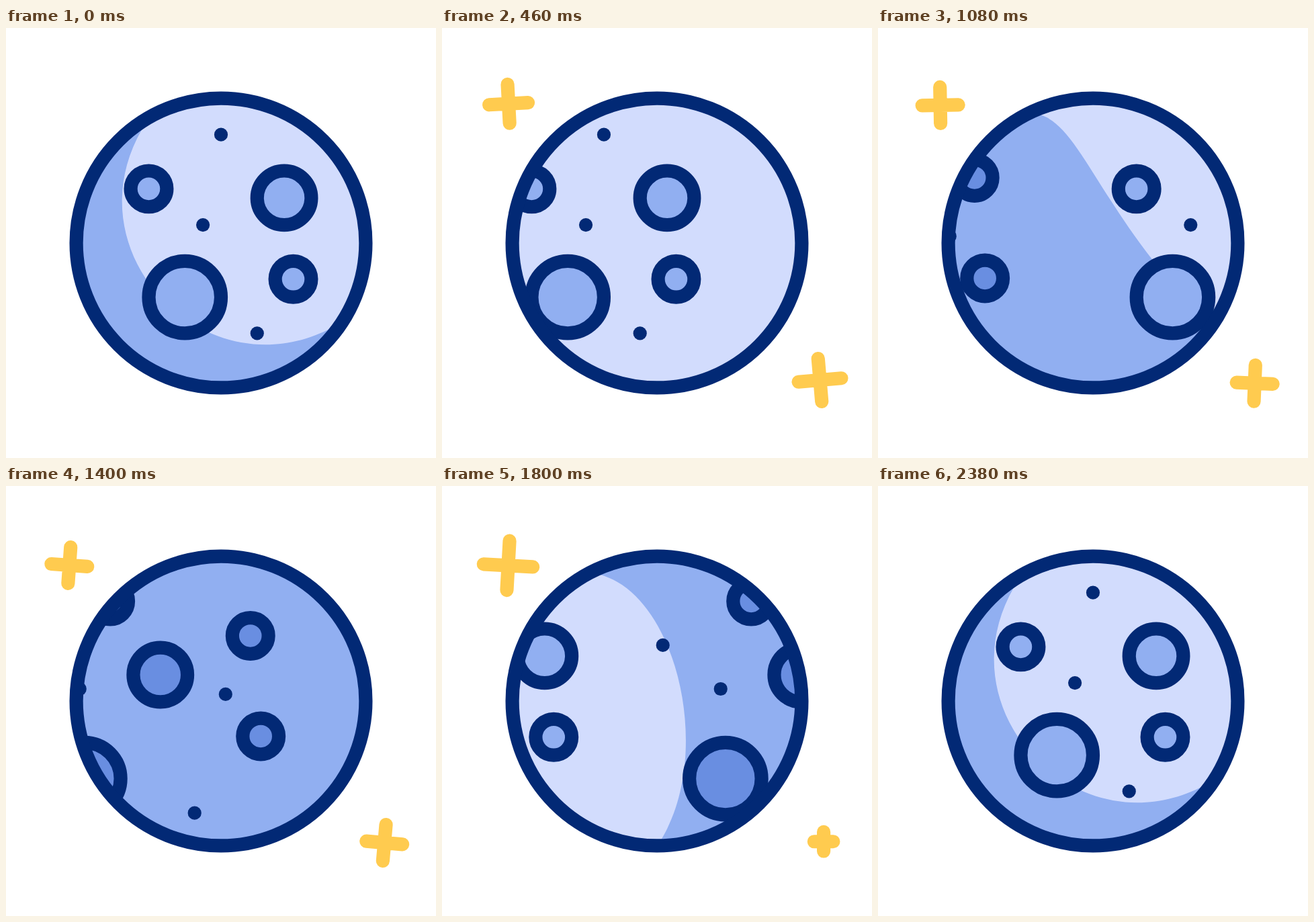
Recreate the animation shown at these times as an HTML page. Size 640x640 px, loop 2400 ms.

```html
<!DOCTYPE html>
<html lang="en">
<head>
<meta charset="utf-8">
<title>Rotating moon</title>
<style>
  html, body { margin: 0; width: 100%; height: 100%; overflow: hidden; background: #fff; }
  svg { display: block; width: 100%; height: 100%; }
</style>
</head>
<body>
<svg viewBox="0 0 640 640" fill="none" stroke-width="20.2" stroke-linecap="round">
  <clipPath id="disc"><circle cx="320" cy="320" r="220"/></clipPath>
  <g clip-path="url(#disc)">
    <circle cx="320" cy="320" r="216" fill="#91aff1"/>
    <path id="light" fill="#d2dcfd"/>
    <path id="shade" fill="#91aff1"/>
    <g id="craters" stroke="#022975"></g>
  </g>
  <circle cx="320" cy="320" r="215.4" stroke="#022975"/>
  <path id="starA" stroke="#ffcb4f"/>
  <path id="starB" stroke="#ffcb4f"/>
</svg>
<script>
const LOOP = 2400, TURN = 958.5, CELL = 13.44, MID = 320;
const $ = id => document.getElementById(id);
const mix = (a, b, u) => a + (b - a) * u;
const clamp = (v, a, b) => Math.min(b, Math.max(a, v));
const smooth = u => u * u * (3 - 2 * u);
const ramp = (v, a, b) => smooth(clamp((v - a) / (b - a), 0, 1));

// Surface travel: wind-up to the left, then one full turn to the right.
const TRAVEL = [
  [0, 0], [520, -79], [780, -35], [1080, 171.5],
  [1400, 391.5], [1800, 696.5], [2120, 920], [LOOP, TURN]
];
// Star path: time, x, y
const DRIFT = [[90, 569, 525.5], [460, 562.5, 524], [840, 560, 526.5], [1400, 563.2, 531], [1900, 568.5, 529]];

// Light edges, each one Bezier curve.
const DUSK = [
  [-35, [[145, 205], [85, 330], [215, 512], [360, 525]]],
  [0, [[202.5, 150.5], [93.5, 339.3], [304.7, 550.5], [493.5, 441.5]]],
  [171.5, [[228, 128], [300, 128], [330, 290], [500, 445]]]
];
const DAWN = [[225, 130], [347, 150], [408, 400], [322, 532]];

// Craters in grid cells from the centre: x, y, radius (none = dot).
const near = addCraters("#91aff1", [
  [0, -12], [-2, -2], [4, 10], [-8, -6, 2], [7, -5, 3], [-4, 6, 4], [8, 4, 2]
]);
const far = addCraters("#698ee1", [
  [-15.57, -6.18], [6.98, -0.75], [-9.17, -1.34], [3.55, 12.4], [-0.24, -2.9, 3],
  [9.73, -7.22, 2], [10.88, 3.9, 2], [-5.79, -11.05, 2], [-8.64, 8.6, 4]
]);

function addCraters(fill, list) {
  const g = document.createElementNS("http://www.w3.org/2000/svg", "g");
  g.innerHTML = list.map(([x, y, r]) =>
    `<circle cx="${MID + x * CELL}" cy="${MID + y * CELL}" ` +
    (r ? `r="${r * CELL}" fill="${fill}"/>` : `r="10.1" fill="#022975" stroke="none"/>`)).join("");
  $("craters").append(g);
  return g;
}

// Index of the key span holding v, and the fraction inside it.
function span(keys, v) {
  const last = keys.length - 1;
  v = clamp(v, keys[0][0], keys[last][0]);
  let i = 0;
  while (i < last - 1 && v > keys[i + 1][0]) i++;
  return [i, (v - keys[i][0]) / (keys[i + 1][0] - keys[i][0])];
}

// Smooth curve through the keys; it rests at both ends.
function glide(keys, t, c = 1) {
  const [i, u] = span(keys, t);
  const gap = k => keys[k + 1][0] - keys[k][0];
  const rate = k => (keys[k + 1][c] - keys[k][c]) / gap(k);
  const slope = k => k === 0 || k === keys.length - 1 ? 0
    : (rate(k - 1) * gap(k) + rate(k) * gap(k - 1)) / (gap(k - 1) + gap(k));
  const w = 1 - u;
  return mix(keys[i][c], keys[i + 1][c], smooth(u)) +
    gap(i) * u * w * (w * slope(i) - u * slope(i + 1));
}

// Everything left of an edge.
function leftOf(pts, dx, dy) {
  const [a, b, c, d] = pts.map(([x, y]) => [x + dx, y + dy]);
  return `M${a}C${b} ${c} ${d}V700H-50V-50H${a[0]}Z`;
}

// The edge morphs while on the disc and slides away beyond it.
function duskShape(p) {
  const [i, u] = span(DUSK, p);
  const pts = DUSK[i][1].map((a, k) => a.map((n, c) => mix(n, DUSK[i + 1][1][k][c], u)));
  const before = Math.min(0, p - DUSK[0][0]), after = Math.max(0, p - DUSK[2][0]);
  return leftOf(pts, 1.4 * (before + after), -1.1 * before - 0.55 * after);
}

function dawnShape(p) {
  const d = p - 696.5;
  return leftOf(DAWN, d, -0.1 * d);
}

function drawStar(el, t, dx, dy) {
  const s = Math.min(t - 100, 1905 - t);
  const arm = 38 * ramp(s, 0, 250) - 11 * ramp(s, 250, 460);
  const tilt = -5 * Math.sin(2 * Math.PI * (t - 90) / 1710);
  el.style.display = arm > 0.5 ? "" : "none";
  el.setAttribute("d", `M${-arm} 0H${arm}M0 ${-arm}V${arm}`);
  el.setAttribute("transform",
    `translate(${glide(DRIFT, t, 1) + dx} ${glide(DRIFT, t, 2) + dy}) rotate(${tilt})`);
}

function draw(t) {
  const p = glide(TRAVEL, t), past = p > 420;
  const front = past ? p - TURN : p;
  $("light").setAttribute("d", dawnShape(past ? p : TURN));
  $("shade").setAttribute("d", duskShape(front));
  near.setAttribute("transform", `translate(${front} 0)`);
  far.setAttribute("transform", `translate(${p - TURN / 2} 0)`);
  drawStar($("starA"), t - 190, -467.3, -412);
  drawStar($("starB"), t, 0, 0);
}

const start = performance.now();
function tick() {
  draw((performance.now() - start) % LOOP);
  requestAnimationFrame(tick);
}
draw(0);
requestAnimationFrame(tick);
</script>
</body>
</html>
```
